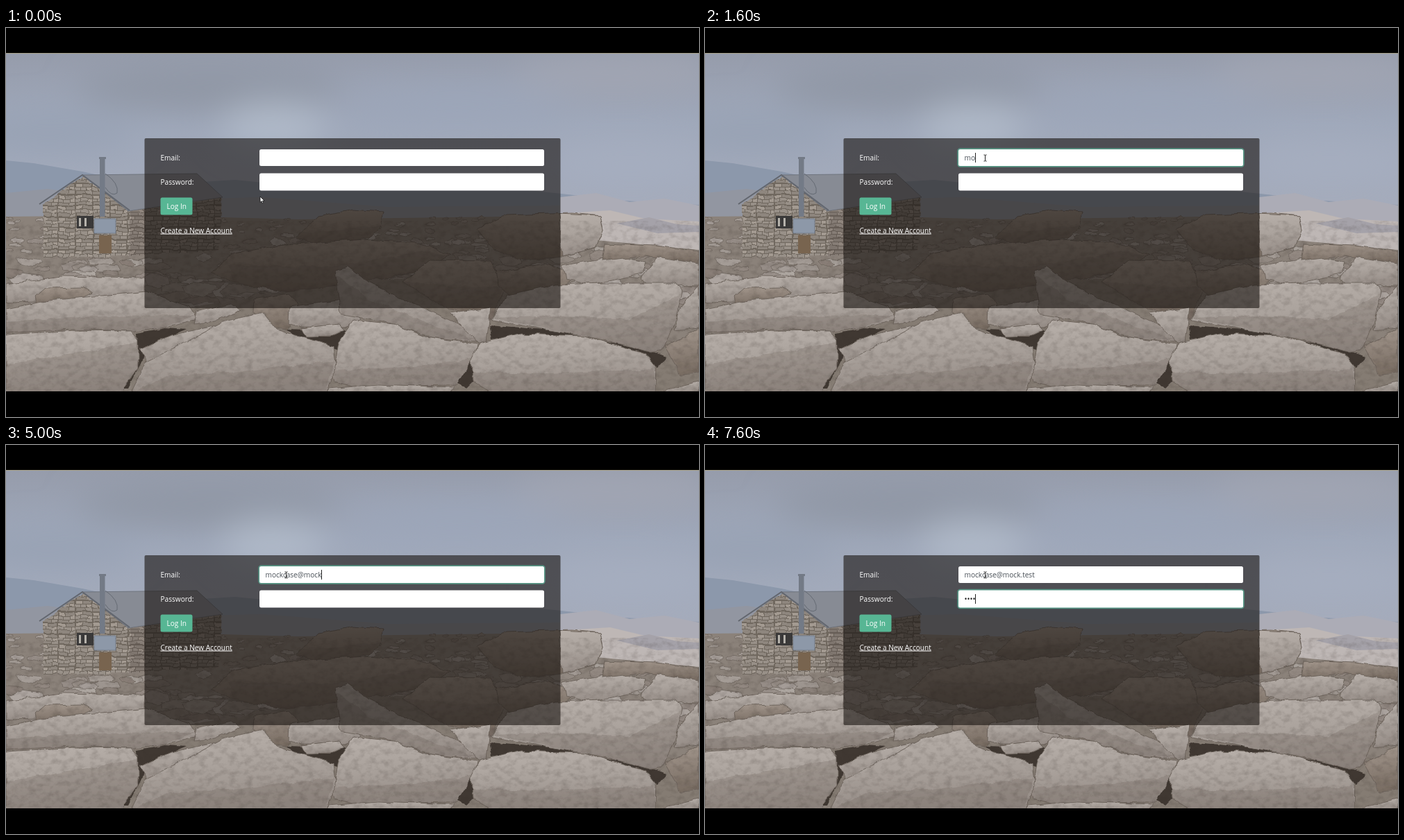
Write an HTML page that moves like this. It is 998 px wide and 561 px high and loops after 8 s.

```html
<!DOCTYPE html>
<html lang="en">
<head>
<meta charset="utf-8">
<title>Log in form</title>
<style>
html, body { margin: 0; width: 100%; height: 100%; overflow: hidden; background: #000; }
svg { position: absolute; left: 0; top: 0; width: 998px; height: 561px; }
#scene { will-change: transform; }
text { font: 10.1px "Open Sans", "Noto Sans", sans-serif; fill: #fff; white-space: pre; }
.typed { fill: #495057; }
#rocks path { stroke: #6a615a; stroke-width: .9; fill: url(#stone); }
#rocks .dim { fill: url(#dim); }
#rocks .face { fill: #70675f; fill-opacity: .28; stroke: none; }
#rocks .bed { fill: #857b73; stroke: none; }
#rocks .gap { fill: #3f3832; stroke: none; }
</style>
</head>
<body>
<svg id="scene" viewBox="0 0 998 561">
  <defs>
    <linearGradient id="sky" x2="0" y2="1">
      <stop stop-color="#969cab"/><stop offset=".4" stop-color="#9fa8ba"/>
      <stop offset="1" stop-color="#a6acbb"/>
    </linearGradient>
    <linearGradient id="stone" x2=".15" y2="1">
      <stop stop-color="#b8b0aa"/><stop offset=".5" stop-color="#aaa29c"/>
      <stop offset="1" stop-color="#968d87"/>
    </linearGradient>
    <linearGradient id="dim" x2=".1" y2="1">
      <stop stop-color="#a3978d"/><stop offset="1" stop-color="#796d63"/>
    </linearGradient>
    <pattern id="wall" width="25" height="16" patternUnits="userSpaceOnUse">
      <path fill="#6f675f" d="M0 0h25v16H0z"/>
      <path fill="#a39a91" d="M1 1h9v4H1zM18 6h6v4h-6z"/>
      <path fill="#8e867e" d="M11 1h13v4H11zM1 11h14v4H1z"/>
      <path fill="#989088" d="M0 6h7v4H0zM8 6h9v4H8zM16 11h8v4h-8z"/>
    </pattern>
    <filter id="soft" x="-100%" y="-200%" width="300%" height="500%"><feGaussianBlur stdDeviation="24"/></filter>
    <filter id="rough">
      <feTurbulence type="fractalNoise" baseFrequency=".05" numOctaves="3" seed="4"/>
      <feDisplacementMap in="SourceGraphic" scale="7" xChannelSelector="R" yChannelSelector="G"/>
    </filter>
    <filter id="grain" x="0" y="0" width="1" height="1" color-interpolation-filters="sRGB">
      <feTurbulence type="fractalNoise" baseFrequency=".09 .13" numOctaves="4" seed="9"/>
      <feColorMatrix values="0 0 0 0 .2 0 0 0 0 .17 0 0 0 0 .15 2.4 0 0 0 -1"/>
    </filter>
    <clipPath id="photo"><path d="M0 37h998v487H0z"/></clipPath>
  </defs>

  <path fill="#aaa48c" d="M0 36h998v1H0z"/>
  <g clip-path="url(#photo)">
    <path fill="url(#sky)" d="M0 37h998v250H0z"/>
    <g filter="url(#soft)">
      <ellipse cx="290" cy="85" rx="190" ry="34" fill="#9097a5"/>
      <ellipse cx="60" cy="150" rx="130" ry="30" fill="#98a2b4"/>
      <ellipse cx="385" cy="142" rx="75" ry="34" fill="#b0bac9"/>
      <ellipse cx="650" cy="110" rx="170" ry="26" fill="#9ca6b9"/>
      <ellipse cx="880" cy="65" rx="150" ry="26" fill="#a2a6b3"/>
      <ellipse cx="900" cy="195" rx="130" ry="30" fill="#a6aec0"/>
    </g>
    <path fill="#8c98ab" d="M0 191l40 4 70 12 90 20 130-8 140 14 160-12 170 18 90 10 108 6v50H0z"/>
    <path fill="#9296a1" d="M0 238l60-6 120 16 190-4 180 14 250-2v34H0z"/>
    <path fill="#acacb6" d="M798 244l52-6 48 13 50-5 50 10v58H798z"/>
    <path fill="#beb7b5" d="M790 268l80-5 50 12 78 4v42H790z"/>
    <path fill="#a5a2a9" d="M880 282l46-9 40 10 32 2v9l-60 2z"/>
    <path fill="#8b827a" d="M0 272l200-2 220 6 300-4 130 34 148 14v210H0z"/>

    <g id="rocks" filter="url(#rough)">
      <g id="rubble"></g>
      <path class="bed" d="M185 424l90-22 120-20 90-22 240 5 190 80 85 10v75H180z"/>
      <path class="dim" d="M418 302l32-31 50-9 43 3-4 22-16 15-74 13z"/>
      <path class="face" d="M421 296l58-5 62-7-17 18-72 12-33-4z"/>
      <path class="dim" d="M294 352l36-27 70-13 118-7 74 4 48 17-42 25-120 21-78 8-72-12z"/>
      <path class="face" d="M320 342l150 2 130-22 36 4-38 25-120 21-78 8-72-12z"/>
      <path class="dim" d="M678 291l42-21 95-3 41 4 4 20-10 25-50 14-55 5-42-16z"/>
      <path d="M796 268l60 3 4 20-10 25-50 14z"/>
      <path class="dim" d="M572 366l38-31 88 1 20 38-18 46-62-14z"/>
      <path class="face" d="M572 366l70 6 74 2-16 46-62-14z"/>
      <path class="dim" d="M705 352l72-12 42 16-14 15-80 14-16-12z"/>
      <path class="dim" d="M357 392l50-8 14 13-15 38-20-2-30-24z"/>
      <path d="M408 402l76-10 26 28-20 12-66-1-17-6z"/>
      <path class="gap" d="M405 434l22 1 5 11 34 0 21-10 12 3-18 26-60-15z"/>
      <path d="M425 433l53-6 9 9-20 9-35 1z"/>
      <path d="M474 350l18-5 30 22 46 22 92 42 18 22-66-7-60-20-70-14z"/>
      <path class="face" d="M474 354l46 36 90 36 64 24-62-4-60-20-70-14z"/>
      <path d="M640 412l58-9-6 50-12 2z"/>

      <path d="M0 369l80-11 120 2v20l-90 14-110 2z"/>
      <path class="dim" d="M42 387l14-12 56-1 13 8-25 12-56 6z"/>
      <path d="M0 405l62-12 140-13 62 22 11 18-46 11-45 6-90-3-94 6z"/>
      <path class="face" d="M0 423l130-7 142-1-43 15-45 6-90-2-94 6z"/>
      <path class="gap" d="M187 440l43-8 30 2-60 26-4 20-20 40h-12l26-42z"/>
      <path d="M274 410l50-12 14 9-38 16-30 4z"/>
      <path d="M192 464l50-22 66-14 20 0-98 46-26 9z"/>
      <path d="M0 442l100-6 80 1 10 12v42l-26 38H0z"/>
      <path class="face" d="M0 484l110-16 80-16v39l-26 37H0z"/>
      <path d="M179 528l23-47 78-39 35-19 56-13 18 25 82 24 4 33-14 36z"/>
      <path class="face" d="M180 526l50-24 120-8 122-14-12 48z"/>
      <path d="M471 500l8-46 22-32 59 6 44 17 76 11-5 25-26 34-150 2-26-7z"/>
      <path class="face" d="M472 494l100-4 106-14-29 39-150 2-26-7z"/>
      <path class="gap" d="M670 482l-20 31 14 6 8-8z"/>
      <path d="M465 520l70-6 110 4-8 10H462z"/>

      <path d="M800 343l76-14 45 8-5 18-74 15-36-8z"/>
      <path class="dim" d="M862 311l74 3 62 8v18l-78-12-62 8z"/>
      <path d="M914 362l24-32 60 10v32l-72-1z"/>
      <path class="gap" d="M696 428l90 8 150 32 16 6-14 16-110-42-100-2-28 4z"/>
      <path d="M699 421l22-36 70-15 70-2 104 0 9 13-9 40-21 44-15 3-78-20z"/>
      <path class="face" d="M700 418l100-3 100 5 72-36-7 37-21 44-15 3-78-20z"/>
      <path d="M970 405l28-34v62l-36 4z"/>
      <path class="dim" d="M948 458l50-24v64l-26 2z"/>
      <path d="M940 525l58-16v20h-62z"/>
      <path d="M670 482l12-27 60-14 90 3 88 26 16 20-1 36H700l-28-16z"/>
      <path class="face" d="M672 496l110 2 152-6v34H700l-28-16z"/>
    </g>
    <path filter="url(#grain)" opacity=".17" d="M0 278h998v246H0z"/>

    <g filter="url(#rough)">
      <path fill="url(#wall)" d="M54 254l56-41 68 49 132-20-4 78-128 9-124 2z"/>
      <path fill="#3c3530" fill-opacity=".2" d="M178 262l132-20-4 78-128 9z"/>
    </g>
    <path fill="#878b94" stroke="#666b74" stroke-width=".8" d="M110 212l165-2 37 34-136 20z"/>
    <path fill="none" stroke="#62666e" stroke-width="2" d="M48 254l62-42 68 51"/>
    <path fill="#3a3939" d="M102 271h24v18h-24z"/>
    <path fill="#b5b2ab" d="M105 274h3v12h-3zM113 274h3v12h-3z"/>
    <path fill="#78644f" d="M134 299h18v26h-18z"/>
    <path fill="#8d98a8" stroke="#737b87" d="M127 275h31v21h-31z"/>
    <path fill="#737a86" d="M135 188h7.500v84H135zM134 186h10v3h-10z"/>
    <path fill="none" stroke="#5c626b" stroke-width=".8" d="M143 210q20 14 17 28-8 6-17-8"/>
  </g>
</svg>

<svg id="form" viewBox="0 0 998 561">
  <defs>
    <filter id="shade"><feDropShadow dx="0" dy="1" stdDeviation="1" flood-opacity=".4"/></filter>
    <filter id="halo"><feGaussianBlur stdDeviation=".7"/></filter>
  </defs>
  <rect x="199.5" y="159" width="599" height="245" rx="2" fill="#18130f" fill-opacity=".6"/>
  <text x="222.5" y="190.500">Email:</text>
  <text x="222.5" y="225.5">Password:</text>
  <rect x="222.5" y="244.5" width="46" height="25" rx="2.5" fill="#57b694"/>
  <text x="231.5" y="261">Log In</text>
  <text x="222.5" y="295.5" text-decoration="underline">Create a New Account</text>
  <g fill="none" stroke="#5cc4a4" stroke-width="2.4" filter="url(#halo)">
    <rect id="glow0" x="364.5" y="174.5" width="411" height="25" rx="3"/>
    <rect id="glow1" x="364.5" y="209" width="411" height="26" rx="3"/>
  </g>
  <rect x="365" y="175" width="410" height="24" rx="2.5" fill="#fff"/>
  <rect x="365" y="209.5" width="410" height="25" rx="2.5" fill="#fff"/>
  <text id="email" class="typed" x="373.5" y="190.5"></text>
  <text id="dots" class="typed" x="373.5" y="225.5" style="font-size:10.6px;fill:#222"></text>
  <g id="menu">
    <rect x="365" y="200" width="125.5" height="34" fill="#fff" stroke="#c4c4c4" stroke-width=".7" filter="url(#shade)"/>
    <path stroke="#dedede" d="M365.5 206.5H490"/>
    <text x="372.5" y="219" style="font-size:8.4px;font-weight:600;fill:#222">helen.i@sample.test</text>
  </g>
  <path id="caret" stroke="#222" d="M0 0v14"/>
  <path id="arrow" fill="#fff" stroke="#111" stroke-width=".8" d="M0 0v8.5l2-1.8 1.4 3.1 1.4-.6-1.4-3h2.7z"/>
  <path id="beam" fill="none" stroke="#222" d="M-2-4.5h1.5L0-4l.5-.5H2M0-4V4M-2 4.5h1.5L0 4l.5.5H2"/>
</svg>

<script>
const $ = id => document.getElementById(id);
const LOOP = 8000, STEP = 200, ADDRESS = "mockcase@mock.test";
// moments at which each character has appeared
const KEYS = [1400, 1600, 1800, 2000, 2400, 2600, 2600, 2800, 3800,
  4600, 4800, 4800, 5000, 5400, 5600, 5800, 6000, 6200];
const DOTS = [7000, 7200, 7400, 7600];
const CARET_OFF = [[0, 1000], [2200, 2400], [3200, 3600], [6400, 6600]];

const within = (t, a, b) => t >= a && t < b;
const count = (times, t) => times.filter(k => k <= t).length;
const show = (id, on) => $(id).setAttribute("opacity", +on);
const place = (id, x, y) => $(id).setAttribute("transform", `translate(${x} ${y})`);

function scatterRubble() {
  let seed = 11;
  const rnd = () => (seed = seed * 16807 % 2147483647) / 2147483647;
  const stones = Array.from({ length: 430 }, () => ({ x: rnd() * 998, y: 274 + 135 * rnd() ** 1.3 }))
    .filter(s => s.x < 790 || s.y > 318)
    .sort((a, b) => a.y - b.y);
  $("rubble").innerHTML = stones.map(({ x, y }) => {
    const w = 4 + (y - 270) * .17 * (.5 + rnd()), h = w * (.25 + .2 * rnd());
    const pts = Array.from({ length: 6 }, (_, i) => {
      const a = i * Math.PI / 3 + rnd() * .6;
      return `${(x + w * Math.cos(a)).toFixed(1)},${(y + h * Math.sin(a)).toFixed(1)}`;
    });
    return `<polygon points="${pts.join(" ")}" fill="hsl(25 7% ${50 + rnd() * 16}%)" stroke="#6b625b" stroke-width=".7"/>`;
  }).join("");
}

function draw(now) {
  const t = Math.floor(now % LOOP / STEP) * STEP;

  const u = Math.min(t / 600, 1), ease = u * u * (3 - 2 * u);
  const x = 366 + 37.5 * ease, y = 243 - 55.5 * ease;
  const overInput = within(y, 175, 199) || within(y, 209, 235);
  place("arrow", x, y);
  place("beam", x, y);
  show("arrow", !overInput);
  show("beam", overInput);

  const second = t >= 6600;
  $("email").textContent = ADDRESS.slice(0, count(KEYS, t));
  $("dots").textContent = "•".repeat(count(DOTS, t));
  const active = $(second ? "dots" : "email");
  place("caret", Math.round(373 + active.getComputedTextLength()) + .5, second ? 215 : 180);
  show("caret", !CARET_OFF.some(([a, b]) => within(t, a, b)));
  show("menu", within(t, 1000, 1400));

  $("glow0").setAttribute("opacity", within(t, 1000, 6800) ? .6 : 0);
  $("glow1").setAttribute("opacity", t >= 6800 ? .6 : 0);
}

scatterRubble();
const start = performance.now();
function tick() {
  draw(performance.now() - start);
  requestAnimationFrame(tick);
}
tick();
</script>
</body>
</html>
```
